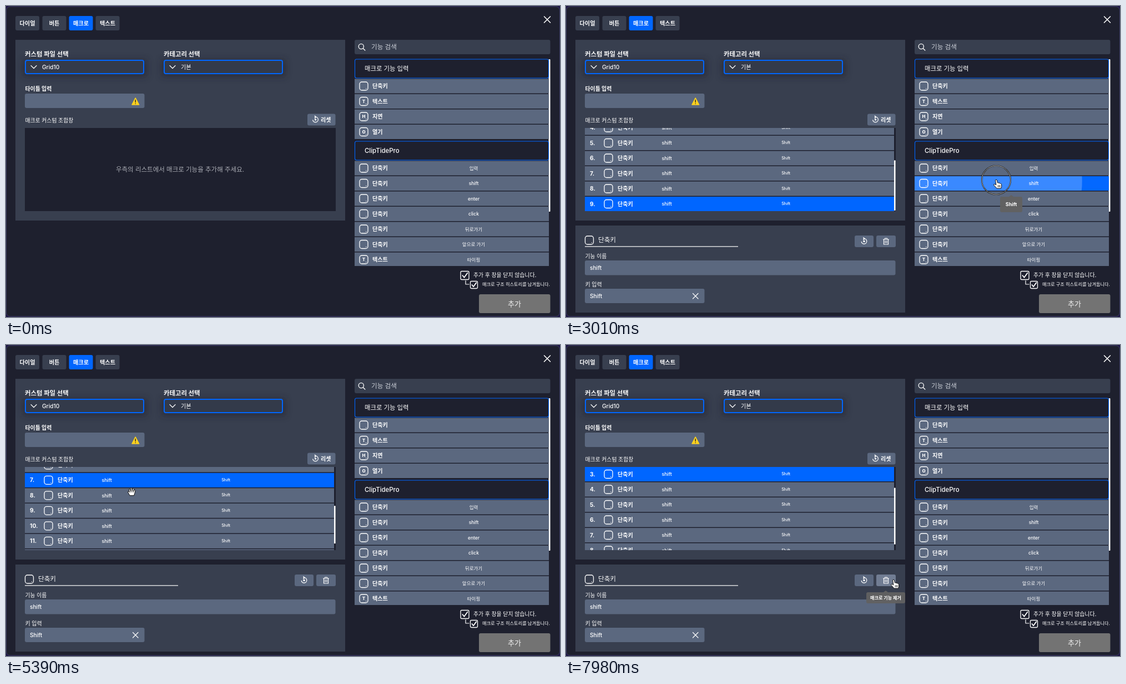
An HTML page that plays this animation: 998x561 px, repeating every 8000 ms.

```html
<!DOCTYPE html>
<html lang="ko">
<head>
<meta charset="utf-8">
<title>매크로</title>
<style>
html, body { margin: 0; width: 998px; height: 561px; overflow: hidden; background: #1d1644; }
svg { display: block; font-family: Inter, "Noto Sans CJK KR", "Noto Sans CJK", "Noto Sans KR", sans-serif; }
</style>
</head>
<body>
<svg width="998" height="561" viewBox="0 0 998 561">
  <defs>
    <clipPath id="listClip"><rect x="34" y="220" width="560" height="150"/></clipPath>
    <clipPath id="menuClip"><rect x="627" y="90" width="352" height="379"/></clipPath>
    <clipPath id="rowClip"><rect x="628" y="307" width="350" height="26"/></clipPath>
    <filter id="soft" x="-20%" y="-80%" width="140%" height="260%"><feGaussianBlur stdDeviation="6"/></filter>
  </defs>
  <g id="base"></g>
  <g id="list" clip-path="url(#listClip)"></g>
  <g id="detail"></g>
  <g id="menu" clip-path="url(#menuClip)"></g>
  <g id="top"></g>
</svg>
<script>
const BG = '#1e202e', PANEL = '#383f4f', ROW = '#5b687f', BLUE = '#0066ff';
const PITCH = 27.5, LOOP = 8000;
const $ = id => document.getElementById(id);

const box = (x, y, w, h, fill, r = 0, more = '') =>
  `<rect x="${x}" y="${y}" width="${w}" height="${h}" rx="${r}" fill="${fill}" ${more}/>`;
const text = (x, cy, s, size, weight = 500, fill = '#fff', anchor = 'start') =>
  `<text x="${x}" y="${cy + size * .36}" font-size="${size}" font-weight="${weight}" fill="${fill}" text-anchor="${anchor}">${s}</text>`;
const line = (d, w = 1.3, stroke = '#fff') =>
  `<path d="${d}" fill="none" stroke="${stroke}" stroke-width="${w}" stroke-linecap="round" stroke-linejoin="round"/>`;
const at = (x, y, s) => `<g transform="translate(${x} ${y})">${s}</g>`;

const badge = (x, y, c = '') => at(x, y,
  box(-7.5, -7.5, 15, 15, 'none', 4, 'stroke="#fff" stroke-width="1.3"') +
  text(0, 0, c, 8, 800, '#fff', 'middle') + '<circle cx="4.3" cy="4.5" r=".7" fill="#fff"/>');
const resetIcon = (x, y) => at(x, y,
  line('M-1 -4.8A4.8 4.8 0 1 1 -4.7 1M-1.2 -6.8L1 -4.8L-1.2 -2.8') + '<circle r="1.7" fill="#fff"/>');
const select = (x, label, value) =>
  text(x, 87, label, 11.4, 700) +
  box(x - 4, 96, 224, 32, '#20242f', 4, 'opacity=".55" filter="url(#soft)"') +
  box(x + 1, 98, 213, 24, '#333a4a', 3, `stroke="${BLUE}" stroke-width="2"`) +
  line(`M${x + 11} 107.5l5 5l5 -5`, 1.2) + text(x + 31, 110, value, 10.2, 500);
const check = (x, y, s) =>
  box(x - s, y - s, 2 * s, 2 * s, 'none', 2, 'stroke="#fff" stroke-width="1.3"') +
  line(`M${x - s * .55} ${y}l${s * .4} ${s * .5}l${s * .8} ${-s * 1.1}`, 1.8);
const tip = (x, y, w, h, s, size) =>
  `<path d="M${x + w / 2 - 4} ${y}l4 -3l4 3z" fill="#616161"/>` +
  box(x, y, w, h, '#616161', 3, 'opacity=".95"') +
  text(x + w / 2, y + h / 2, s, size, 700, '#fff', 'middle');

function drawBase() {
  let s = box(.5, 1, 997, 559, BG, 7, 'stroke="#3b3a62"');
  [['다이얼', 17, 43], ['버튼', 65.5, 43], ['매크로', 113.5, 43], ['텍스트', 161.5, 43]].forEach(([name, x, w], i) => {
    s += box(x, 18, w, 26, i == 2 ? BLUE : PANEL, 3) + text(x + w / 2, 31, name, 10.1, 600, '#fff', 'middle');
  });
  s += line('M969.5 19l11 11M980.5 19l-11 11', 1.6);
  s += box(17, 61, 594, 326, PANEL);
  s += select(34, '커스텀 파일 선택', 'Grid10') + select(284, '카테고리 선택', '기본');
  s += text(34.5, 149, '타이틀 입력', 9.9, 700) + box(34, 158, 215.5, 26, ROW, 3);
  s += '<path d="M233.2 166L239.5 178H227z" fill="#ffd21e" stroke="#ffd21e" stroke-width="1.6" stroke-linejoin="round"/>' +
    line('M233.2 169.5v4M233.2 176v.2', 1.4, '#222');
  s += text(34.5, 206, '매크로 커스텀 조합창', 9.85, 500);
  s += box(543, 194.5, 50.5, 21, ROW, 3) + resetIcon(557.5, 205) + text(567, 205, '리셋', 10, 600);
  s += box(34, 220, 560, 150, BG);
  s += box(628, 61, 352.5, 26, PANEL, 3) + '<circle cx="639.8" cy="73" r="4.6" fill="none" stroke="#fff" stroke-width="1.3"/>' +
    line('M643.3 76.5l3.5 3.5') + text(658, 74, '기능 검색', 11.6, 400, '#ccd0d8');
  s += box(977.5, 96, 3, 275, '#fff', 1);
  s += check(826.5, 486, 7.5) + text(842, 485.5, '추가 후 창을 닫지 않습니다.', 9.9, 500);
  s += line('M828 495.5v6.5h6', 1.2) + check(843, 503, 6.5) + text(858, 502.5, '매크로 구조 히스토리를 남겨둡니다.', 8.2, 500);
  s += box(852, 520, 128.5, 34, '#737373', 3) + text(916, 537, '추가', 13, 500, '#f2f2f2', 'middle');
  $('base').innerHTML = s;
}

function detail(hover) {
  return box(17, 396, 594, 157, PANEL) + badge(42, 422.5) + text(58, 422, '단축키', 11.6, 500) +
    box(34, 433.3, 276, 1.2, '#fff') +
    box(520, 414, 34, 21, ROW, 3) + resetIcon(537, 424.5) +
    box(559, 414, 35, 21, hover ? '#717d93' : ROW, 3) +
    at(576.5, 424.5, line('M-5 -3.5H5M-2 -3.5V-5.5H2V-3.5M-4 -3.5V5.5H4V-3.5M-1.4 -1V3M1.4 -1V3', 1.2)) +
    text(34.5, 451, '기능 이름', 9.8, 500) + box(34, 459, 559.5, 26.5, ROW, 3) + text(43, 472.5, 'shift', 10.2, 500) +
    text(34.5, 502, '키 입력', 10, 500) + box(34, 510, 215.5, 26, ROW, 3) + text(43, 523, 'Shift', 10.2, 500) +
    line('M228.5 518.5l9.5 9.5M238 518.5l-9.5 9.5', 1.2);
}

// Menu rows: badge letter, label, hint
const groups = [
  ['매크로 기능 입력', 96, [['', '단축키', ''], ['T', '텍스트', ''], ['H', '지연', ''], ['O', '열기', '']]],
  ['ClipTidePro', 244, [['', '단축키', '입력'], ['', '단축키', 'shift'], ['', '단축키', 'enter'], ['', '단축키', 'click'],
    ['', '단축키', '뒤로가기'], ['', '단축키', '앞으로 가기'], ['T', '텍스트', '타이핑']]]
];
const overMenu = c => c && c.x > 628 && c.x < 978 && c.y > 131 && c.y < 469;

function menu(c) {
  let s = '';
  for (const [title, y, rows] of groups) {
    s += box(628.5, y, 349, 34, BG, 3, `stroke="${BLUE}" stroke-width="1.1"`) + text(646, y + 16.5, title, 11.4, 500);
    rows.forEach(([letter, label, hint], i) => {
      const cy = y + 48.5 + i * PITCH;
      const hot = overMenu(c) && Math.abs(c.y - cy) < 13.5;
      s += box(628, cy - 13, 350, 26, hot ? BLUE : ROW) + badge(644.5, cy, letter) +
        text(660, cy, label, 10.1, 600) + text(842.5, cy, hint, 8.5, 500, '#fff', 'middle');
    });
  }
  return s;
}

const pressAt = k => 950 + 230 * k;
const removeAt = k => 7350 + 175 * k;
const countPast = (t, time, max) => {
  let n = 0;
  while (n < max && t >= time(n)) n++;
  return n;
};
const ease = u => u * u * (3 - 2 * u);
const ramp = (t, a, b) => ease(Math.min(1, Math.max(0, (t - a) / (b - a))));

const path = [[300, 700, 575], [800, 775, 314], [3620, 775, 314], [4060, 206, 243], [4340, 206, 243], [4760, 211, 248],
  [5180, 211, 248], [5600, 241, 281], [6560, 241, 281], [7140, 590, 424], [LOOP, 590, 424]];
function cursorAt(t) {
  const i = path.findIndex(p => t < p[0]);
  if (i < 1) return null;
  const [a, x, y] = path[i - 1], [b, x2, y2] = path[i], u = ramp(t, a, b);
  return { x: x + (x2 - x) * u, y: y + (y2 - y) * u };
}

function ripples(t) {
  let s = '';
  for (let k = 0; k < 12; k++) {
    const age = t - pressAt(k);
    if (age < 0 || age > 460) continue;
    const alpha = .22 * Math.min(1, (460 - age) / 160);
    s += `<circle cx="775" cy="316" r="${age * .7}" fill="#fff" opacity="${alpha}"/>`;
  }
  return `<g clip-path="url(#rowClip)">${s}</g>`;
}

function list(n, scroll, picked) {
  if (!n) return text(313.5, 294.5, '우측의 리스트에서 매크로 기능을 추가해 주세요.', 11.5, 400, '#a9abb3', 'middle');
  const long = n > 5, w = long ? 557 : 559.5;
  let s = '';
  for (let i = 0; i < n; i++) {
    const y = 220 + i * PITCH - scroll, cy = y + 13;
    if (y < 190 || y > 372) continue;
    s += box(34, y, w, 26, picked.includes(i + 1) ? BLUE : ROW) + text(43, cy, i + 1 + '.', 10.2, 700) + badge(76.5, cy) +
      text(93, cy, '단축키', 10, 600) + text(34 + w * .265, cy, 'shift', 8.9, 500, '#fff', 'middle') +
      text(34 + w * .65, cy - .5, 'Shift', 7.2, 500, '#fff', 'middle');
  }
  const k = 150 / (n * PITCH);
  return long ? s + box(591, 220 + scroll * k, 2.6, 150 * k, '#fff', 1) : s;
}

const shape = d => `<path d="${d}" fill="#fff" stroke="#111" stroke-width="1" stroke-linejoin="round"/>`;
const pointer = shape('M-1.5 0Q0 -1.6 1.4 0L2.4 5Q4 4 5 5.6Q6.6 4.8 7.4 6.4Q9 6 9.4 7.6Q10.4 11 8.6 15H1.2Q-1.4 12 -4.4 9Q-4.6 6.8 -2.4 7.4L-.2 9Z') +
  line('M3.2 9.5v3M5.2 9.5v3M7 9.5v3', .8, '#111');
const palm = shape('M-3.2 7Q-5 3 -6.8 .4Q-6.4 -1.4 -4.4 .2L-3.6 1L-5 -4Q-4 -5.8 -2.8 -4L-1.6 -1L-1.8 -6Q-.4 -7.6 .6 -6L1 -1.4L2 -5.6Q3.6 -6.6 4.2 -5L3.6 -.6L5.2 -3.6Q7 -4 6.8 -2.2Q6 3 4.4 7Z') +
  line('M-1.4 -1v2M1 -1.4v2.2M3.4 -.6v1.6', .7, '#111');
const arrow = shape('M0 0V13L3 10.4L5 15L7 14L5 9.6H9Z');

const overTrash = c => c && c.x > 559 && c.x < 594 && c.y > 414 && c.y < 435;
const overList = c => c.x > 34 && c.x < 592 && c.y > 220 && c.y < 370;

function frame(t) {
  const c = cursorAt(t);
  const added = countPast(t, k => pressAt(k) + 35, 12), removed = countPast(t, removeAt, 4);
  const n = added - removed;

  let picked = [n], scroll = Math.max(0, n * PITCH - 151.5);
  if (t >= 4340) scroll += (165 - scroll) * ramp(t, 4340, 4620) - 21.5 * ramp(t, 5180, 5600);
  if (t >= 4480) picked = [7 - removed];
  if (t >= 5400 && t < 6440) picked.push(9);
  if (removed) scroll = (6 - removed) * PITCH;

  $('list').innerHTML = list(n, scroll, picked);
  $('detail').innerHTML = n ? detail(overTrash(c)) : '';
  $('menu').innerHTML = menu(c) + ripples(t);

  let s = '';
  if (t >= 870 && t < 3640) s += tip(782, 344, 40, 28, 'Shift', 9);
  if (t >= 7280) s += tip(541, 446, 70, 20, '매크로 기능 제거', 8.1);
  for (let k = 0; k < 12; k++) {
    if (Math.abs(t - pressAt(k) + 5) < 20)
      s += '<circle cx="775" cy="314" r="26" fill="none" stroke="#111" stroke-width="2.2"/>' +
        '<circle cx="775" cy="314" r="26" fill="none" stroke="#ddd" stroke-width=".8"/>';
  }
  if (c) s += at(c.x, c.y, overMenu(c) || overTrash(c) ? pointer : overList(c) ? palm : arrow);
  $('top').innerHTML = s;
}

drawBase();
const start = performance.now();
(function tick() {
  frame((performance.now() - start) % LOOP);
  requestAnimationFrame(tick);
})();
</script>
</body>
</html>
```
